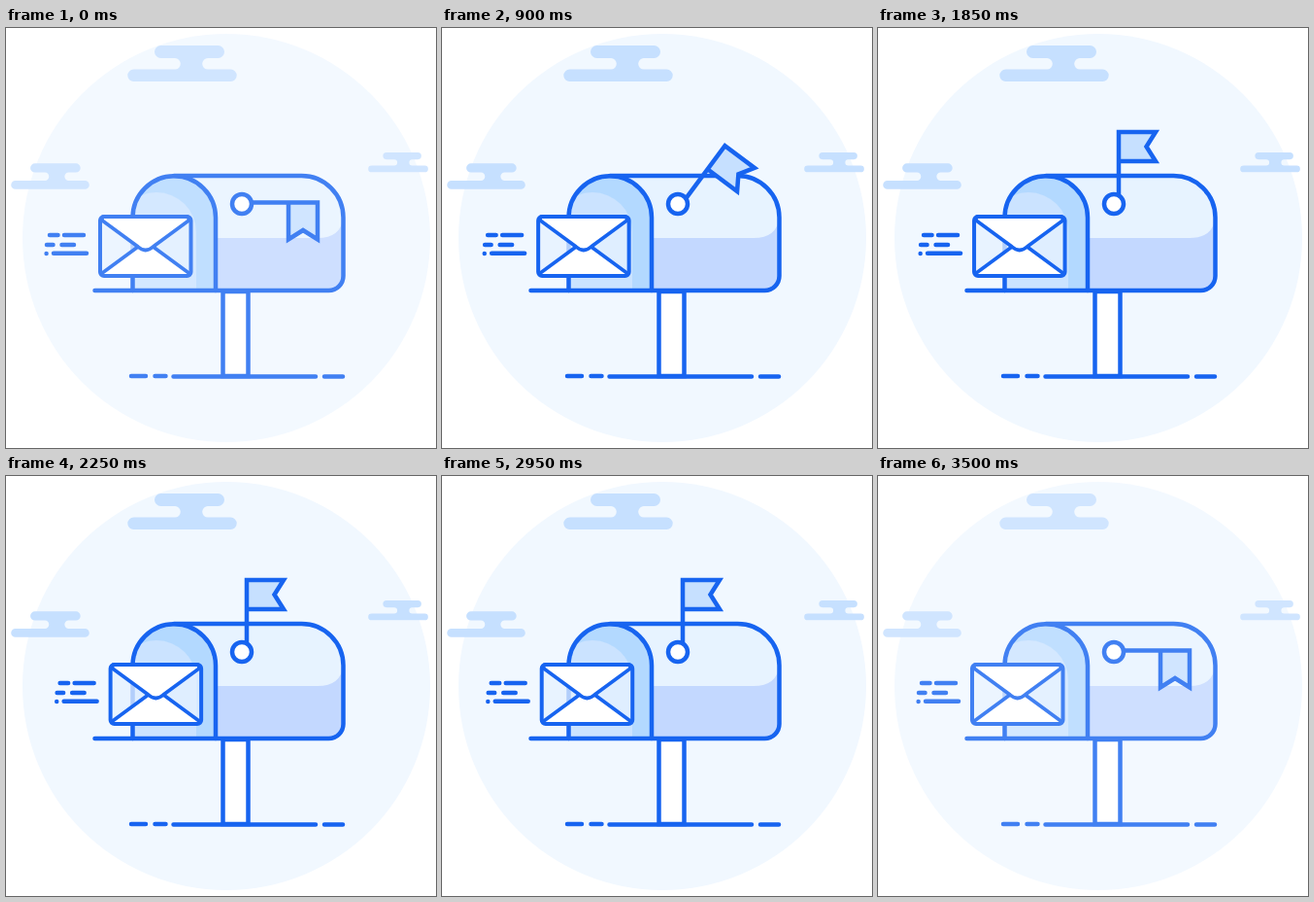
An HTML page for the animation above (3550 ms loop, 443 by 432 pixels).

```html
<!DOCTYPE html>
<html lang="en">
<head>
<meta charset="utf-8">
<title>Mailbox</title>
<style>
  html, body { margin: 0; width: 100%; height: 100%; overflow: hidden; background: #fff; }
  svg { display: block; width: 100vw; height: 100vh; }
  .line { fill: none; stroke: #1764f0; stroke-width: 4.5; stroke-linecap: round; }
</style>
</head>
<body>
<svg viewBox="0 0 443 432">
  <defs>
    <path id="cloud" d="M34.5 0H93.5a6.5 6.5 0 0 1 0 13H83a5.8 5.8 0 0 0 0 11.6H106.5a6.2 6.2 0 0 1 0 12.4H6.5a6.2 6.2 0 0 1 0-12.4H49a5.8 5.8 0 0 0 0-11.6H34.5a6.5 6.5 0 0 1 0-13Z"/>
    <clipPath id="arch"><path d="M130.5 270V195a42.75 42.75 0 0 1 85.5 0V270Z"/></clipPath>
  </defs>
  <g id="scene">
    <circle cx="227" cy="216" r="210" fill="#f1f8ff"/>
    <g fill="#c6e0ff">
      <use href="#cloud" transform="translate(125 18)"/>
      <use href="#cloud" transform="translate(5 139.3) scale(.717)"/>
      <use href="#cloud" transform="translate(373 128) scale(.549)"/>
    </g>

    <!-- post and ground -->
    <rect class="line" x="223.5" y="271" width="26" height="87" style="fill:#fff"/>
    <path class="line" d="M129 358H144M153.5 358H164.5M172.5 358.5H319M328 358.5H347"/>

    <!-- box -->
    <path d="M173 152H304.5a43 43 0 0 1 43 43V255a15 15 0 0 1-15 15H173Z" fill="#c3d8ff"/>
    <path d="M173 152H304.5a43 43 0 0 1 43 43Q345 216 321 216H173Z" fill="#e7f3ff"/>
    <g clip-path="url(#arch)">
      <rect x="130" y="150" width="87" height="121" fill="#b3d9ff"/>
      <path d="M114 270V210a41 41 0 0 1 82 0V270Z" fill="#cbe3ff"/>
    </g>
    <path class="line" d="M173 152H304.5a43 43 0 0 1 43 43V255a15 15 0 0 1-15 15H91.5"/>
    <path class="line" d="M130.5 270V195a42.75 42.75 0 0 1 85.5 0V270"/>

    <!-- flag -->
    <g id="flag">
      <path class="line" d="M248 180V107H286L276.5 122L286 137H248" style="fill:#c6e0ff"/>
    </g>
    <circle class="line" cx="243" cy="181" r="10" style="fill:#fff"/>

    <!-- letter -->
    <g id="letter">
      <path class="line" d="M45 213H53.5M60 213H80M42 223H48.5M57.5 223H70M41.6 232h.01M49 231.8H83"/>
      <rect x="97" y="194" width="93.5" height="61" rx="4" fill="#e6f2ff" fill-opacity=".75"/>
      <path d="M98 254L143.7 220L190 254Z" fill="#fff"/>
      <path class="line" d="M98.5 252.5L136 225M189 252.5L151.5 225" style="stroke-width:3.6"/>
      <path class="line" d="M98.5 197.5L136 225Q143.7 232 151.5 225L189 197.5L187 194H100Z" style="fill:#fff;stroke-width:3.6"/>
      <rect class="line" x="97" y="194" width="93.5" height="61" rx="4" style="stroke-width:4"/>
    </g>
  </g>
</svg>
<script>
  const LOOP = 3550;
  const [scene, flag, letter] = ['scene', 'flag', 'letter'].map(id => document.getElementById(id));

  // eased 0..1 between two times
  function ease(t, from, to) {
    const p = Math.min(1, Math.max(0, (t - from) / (to - from)));
    return (1 - Math.cos(Math.PI * p)) / 2;
  }

  const pulse = (t, up, upEnd, down, downEnd) => ease(t, up, upEnd) - ease(t, down, downEnd);

  // the letter slides in and out twice
  function slide(t) {
    const start = 783, period = LOOP / 3;
    const turns = Math.min(2, Math.max(0, (t - start) / period));
    return 11.3 * (1 - Math.cos(2 * Math.PI * turns));
  }

  function draw(t) {
    const raised = pulse(t, 722, 1042, 3105, 3425);
    scene.setAttribute('opacity', 0.815 + 0.185 * pulse(t, 620, 820, 3090, 3290));
    flag.setAttribute('transform', `rotate(${90 * (1 - raised)} 248.25 179.75)`);
    letter.setAttribute('transform', `translate(${slide(t)} 0)`);
  }

  function tick() {
    draw(performance.now() % LOOP);
    requestAnimationFrame(tick);
  }
  tick();
</script>
</body>
</html>
```
